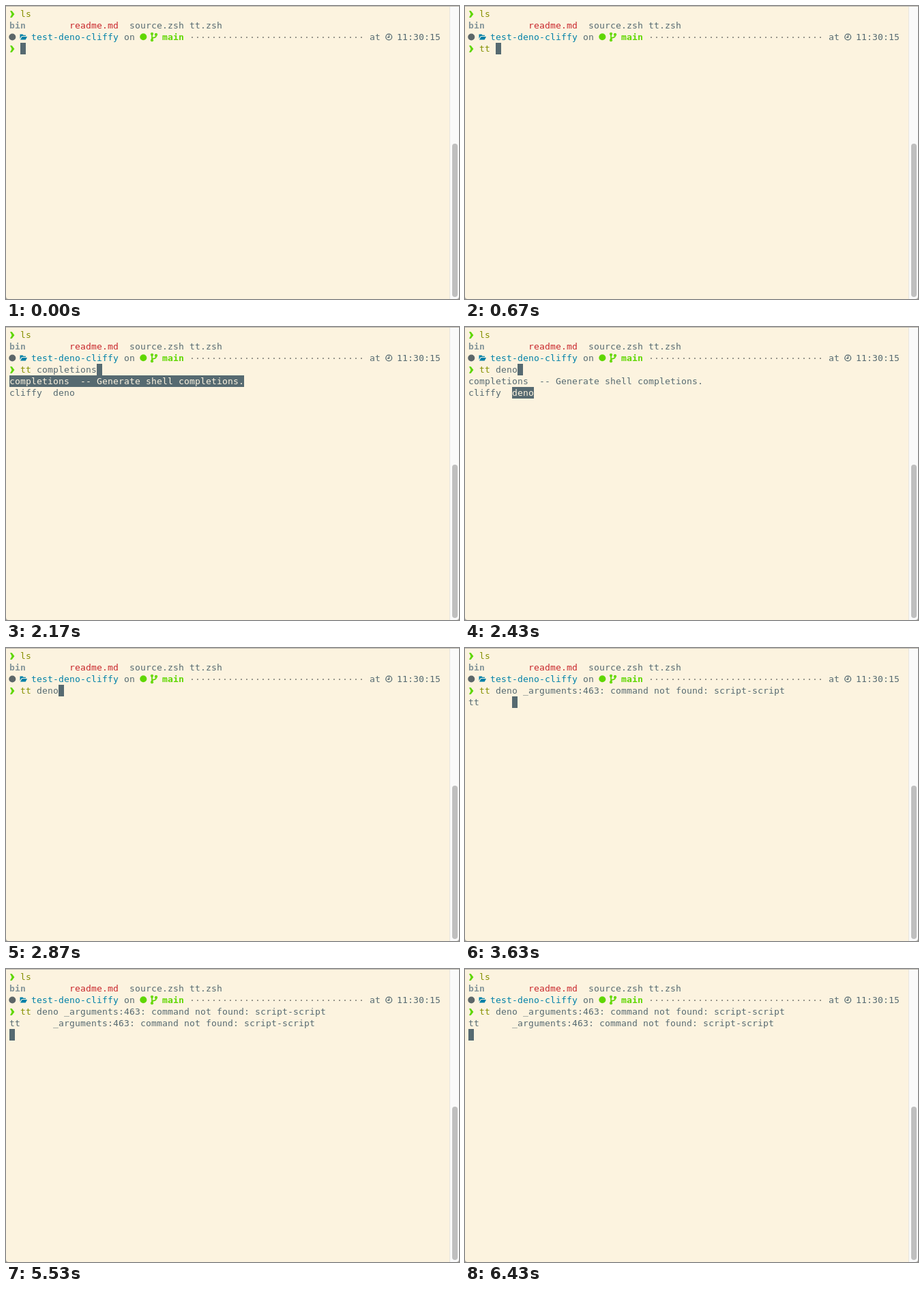
An HTML page for the animation above (6460 ms loop, 664 px wide and 430 px high).

```html
<!DOCTYPE html>
<html lang="en">
<head>
<meta charset="utf-8">
<title>Shell completion</title>
<style>
  html, body { margin: 0; width: 100%; height: 100%; overflow: hidden; background: #fcf3df; }
  #term {
    position: relative; width: 664px; height: 430px; overflow: hidden;
    font: 13px/17px "DejaVu Sans Mono", "Liberation Mono", monospace;
    font-variant-ligatures: none; color: #566a71;
  }
  #term span { position: absolute; height: 17px; white-space: pre; }
  #term svg { position: absolute; left: 0; top: 0; }
  .cmd { color: #859000; }
  .dir { color: #84959a; font-weight: bold; }
  .doc { color: #c8262b; }
  .path { color: #0080a8; }
  .git { color: #5fd700; font-weight: bold; }
  .dots { color: #77766f; }
  .sel { background: #566a71; color: #fcf3df; }
  .cursor { background: #566a71; width: 8px; }
</style>
</head>
<body>
<div id="term">
  <svg width="664" height="430" viewBox="0 0 664 430">
    <rect x="650" width="14" height="430" fill="#fafafa"/>
    <rect x="650" width="1" height="430" fill="#e8e6e1"/>
    <rect x="654" y="202" width="8" height="225" rx="4" fill="#bfbfbf"/>
    <rect width="664" height="1" fill="#bcb8af"/>
    <path d="M0 426Q0 430 4 430H0zM664 426Q664 430 660 430H664z" fill="#a9a69f"/>
    <g fill="#5fd700">
      <path id="chevron" d="M6 7H8.6L12.4 12L8.6 17H6L8.5 12z"/>
      <use href="#chevron" y="51"/>
      <circle cx="201.3" cy="45.3" r="5"/>
    </g>
    <circle cx="9.3" cy="45.5" r="5" fill="#5c6668"/>
    <path d="M20.5 48V41.5H24.5L25.5 42.7H29V44H23zM21 49.6L23.6 45H31L28.7 49.6z" fill="#0080a8"/>
    <g fill="none" stroke="#5fd700" stroke-width="1.7">
      <circle cx="214" cy="40.8" r="1.3"/>
      <circle cx="214" cy="50.2" r="1.3"/>
      <circle cx="220" cy="42" r="1.3"/>
      <path d="M214 42V49M220 43.4Q220 46 217 46.3T214 48.6"/>
    </g>
    <g fill="none" stroke="#566a71" stroke-width="1.3">
      <circle cx="561.2" cy="45.5" r="4.4"/>
      <path d="M561.5 42.6V46H559"/>
    </g>
  </svg>
  <div id="fixed"></div>
  <div id="live"></div>
</div>
<script>
const LOOP = 6460, CELL = 8, LINE = 17;
const term = document.getElementById('term');
const live = document.getElementById('live');

// Fit the font's advance to the terminal cell.
function fitCell() {
  const probe = document.createElement('span');
  probe.textContent = 'm'.repeat(50);
  term.append(probe);
  const advance = probe.getBoundingClientRect().width / 50;
  probe.remove();
  term.style.letterSpacing = (CELL - advance).toFixed(4) + 'px';
}

const put = (row, col, text, cls = '') =>
  `<span class="${cls}" style="left:${5 + col * CELL}px;top:${3 + row * LINE}px">${text}</span>`;
const cursor = (row, col) => put(row, col, '', 'cursor');

const typed = text =>
  put(3, 2, text.slice(0, 2), 'cmd') + put(3, 4, text.slice(2)) + cursor(3, 2 + text.length);

const menu = pick => [
  [4, 0, 'completions', 'completions  -- Generate shell completions.'],
  [5, 0, 'cliffy', 'cliffy'],
  [5, 8, 'deno', 'deno']
].map(([row, col, name, label]) => put(row, col, label, name === pick ? 'sel' : '')).join('');

const choose = name => typed('tt ' + name) + menu(name);

const error = '_arguments:463: command not found: script-script';
const failed = put(3, 2, 'tt', 'cmd') + put(3, 5, 'deno ' + error) + put(4, 0, 'tt');

const steps = [
  [0, typed('')],
  [270, typed('t')],
  [430, typed('tt')],
  [570, typed('tt ')],
  [1170, typed('tt ') + menu()],
  [1870, choose('completions')],
  [2210, choose('cliffy')],
  [2390, choose('deno')],
  [2630, typed('tt deno')],
  [3170, typed('tt deno ')],
  [3330, failed + cursor(4, 8)],
  [3900, failed + put(4, 8, error) + cursor(5, 0)]
];

fitCell();
document.getElementById('fixed').innerHTML = [
  put(0, 2, 'ls', 'cmd'),
  put(1, 0, 'bin', 'dir'),
  put(1, 11, 'readme.md', 'doc'),
  put(1, 22, 'source.zsh tt.zsh'),
  put(2, 4, 'test-deno-cliffy', 'path'),
  put(2, 21, 'on'),
  put(2, 28, 'main', 'git'),
  put(2, 33, '·'.repeat(32), 'dots'),
  put(2, 66, 'at'),
  put(2, 71, '11:30:15')
].join('');

const start = performance.now();
let shown = null;
function draw() {
  const t = (performance.now() - start) % LOOP;
  const step = steps.findLast(([at]) => at <= t);
  if (step !== shown) {
    live.innerHTML = step[1];
    shown = step;
  }
  requestAnimationFrame(draw);
}
draw();
</script>
</body>
</html>
```
